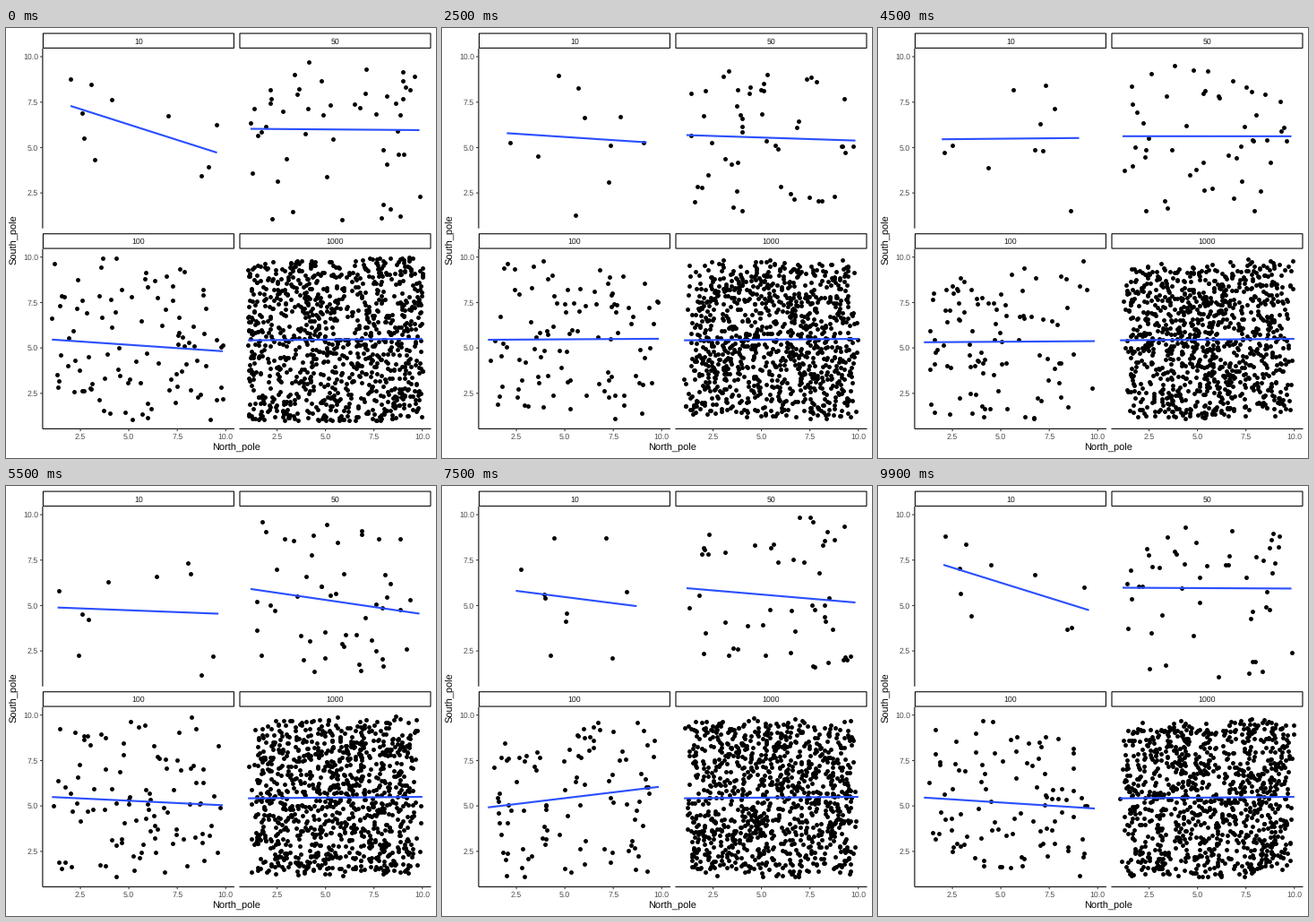
These frames come from a looping animation (480x480 px, 10000 ms). A matplotlib script:

```python
import numpy as np
import matplotlib.pyplot as plt
from matplotlib.animation import FuncAnimation
from matplotlib.patches import Rectangle

SIZE, DPI = 480, 80
PX = 72 / DPI                      # one pixel in points
LEFTS, TOPS = (40.9, 260.45), (22.9, 246.6)
PANEL_W, PANEL_H, STRIP_H = 214.05, 200.8, 17.4
LOW, HIGH = 1, 10                  # data range
VIEW_LOW, VIEW_HIGH = 0.55, 10.45  # data range with 5 % padding
STATES, STEPS = 10, 10
TICKS = (2.5, 5.0, 7.5, 10.0)
BLUE = "#2B50FF"

# Trend at each rest state: heights at both ends, in data units.
TRENDS = {
    10: [(7.29, 4.72), (4.96, 7.6), (5.8, 5.2), (5.67, 6.51), (5.5, 5.6),
         (4.84, 4.49), (5.6, 5.4), (5.76, 5.17), (6.52, 2.15), (6.55, 5.09)],
    50: [(6.03, 5.96), (4.07, 7.14), (5.7, 5.4), (5.48, 5.17), (5.6, 5.7),
         (5.95, 4.5), (5.4, 5.3), (5.98, 5.14), (5.63, 5.56), (5.3, 5.6)],
    100: [(5.46, 4.82), (6.2, 5.3), (5.5, 5.5), (4.73, 5.57), (5.3, 5.4),
          (5.49, 5.02), (5.5, 5.3), (4.84, 6.13), (6.02, 4.94), (5.46, 5.4)],
    1000: [(5.42, 5.5)] * STATES,
}
SPANS = {
    10: [(1.99, 9.55), (1.99, 9.5), (2.0, 9.3), (2.08, 8.11), (2.0, 9.0),
         (1.29, 9.64), (1.8, 9.4), (2.54, 8.65), (1.49, 9.5), (2.68, 9.55)],
    50: [(1.13, 9.85)] * STATES,
    100: [(1.03, 9.85)] * STATES,
    1000: [(1.0, 10.0)] * STATES,
}

plt.rcParams.update({"font.family": "Liberation Sans",
                     "text.hinting": "none"})
rng = np.random.default_rng(12)


def to_px(left, top, x, y):
    scale = VIEW_HIGH - VIEW_LOW
    return (left + (x - VIEW_LOW) / scale * PANEL_W,
            top + (VIEW_HIGH - y) / scale * PANEL_H)


def cloud(n, span, trend):
    """Uniform scatter whose least-squares fit is the given trend."""
    x = rng.uniform(0, 1, n)
    x = np.interp(x, (x.min(), x.max()), span)
    y = rng.uniform(LOW, HIGH, n)
    goal = np.interp(x, span, trend)
    for _ in range(8):
        y += goal - np.polyval(np.polyfit(x, y, 1), x)
        y = LOW + abs(y - LOW)         # fold strays back inside
        y = HIGH - abs(HIGH - y)
    return x, y


def tween(states, frame):
    k, step = divmod(frame, STEPS)
    hold = 3 if k == 0 else 4
    t = max(0, step - hold) / (STEPS - hold)
    t = (1 - np.cos(np.pi * t)) / 2
    return states[k] * (1 - t) + states[(k + 1) % STATES] * t


fig = plt.figure(figsize=(SIZE / DPI, SIZE / DPI), dpi=DPI, facecolor="white")
ax = fig.add_axes([0, 0, 1, 1])
ax.set_xlim(0, SIZE)
ax.set_ylim(SIZE, 0)
ax.axis("off")


def label(x, y, text, size=8.8, color="#4D4D4D", **kw):
    ax.text(x, y, text, fontsize=size * PX, color=color, **kw)


def rule(x, y, color="black"):
    ax.plot(x, y, color=color, lw=1.07 * PX, solid_capstyle="butt",
            snap=False)


def draw_frame(left, top, title):
    inset = 1.07 / 2
    ax.add_patch(Rectangle((left + inset, top - STRIP_H + inset),
                           PANEL_W - 2 * inset, STRIP_H - 2 * inset,
                           fc="white", ec="black", lw=1.07 * PX, snap=False))
    label(left + PANEL_W / 2, top - 5.2, title, color="#1A1A1A", ha="center")
    bottom = top + PANEL_H
    if left == LEFTS[0]:
        rule([left, left], [top, bottom])
        for v in TICKS:
            y = to_px(left, top, 0, v)[1]
            rule([left - 2.75, left], [y, y], "#333333")
            label(left - 4.9, y + 3.2, f"{v:.1f}", ha="right")
    if top == TOPS[1]:
        rule([left, left + PANEL_W], [bottom, bottom])
        for v in TICKS:
            x = to_px(left, top, v, 0)[0]
            rule([x, x], [bottom, bottom + 2.75], "#333333")
            label(x, bottom + 11.3, f"{v:.1f}", ha="center")


layers = []
for i, n in enumerate(TRENDS):
    left, top = LEFTS[i % 2], TOPS[i // 2]
    draw_frame(left, top, str(n))
    ends = list(zip(SPANS[n], TRENDS[n]))
    dots, = ax.plot([], [], "o", color="black", ms=4.9 * PX, mew=0, zorder=3)
    line, = ax.plot([], [], color=BLUE, lw=2.13 * PX, zorder=4,
                    solid_capstyle="butt")
    for artist, data in ((dots, [cloud(n, *e) for e in ends]),
                         (line, ends)):
        states = [np.array(to_px(left, top, *np.array(d))) for d in data]
        layers.append((artist, states))

label(257.5, 471.3, "North_pole", 11, "black", ha="center")
label(9.7, 236, "South_pole", 11, "black", ha="center", va="center",
      rotation=90)


def update(frame):
    for artist, states in layers:
        artist.set_data(*tween(states, frame))
    return [artist for artist, _ in layers]


anim = FuncAnimation(fig, update, frames=STATES * STEPS, interval=100,
                     repeat=True, repeat_delay=0)
plt.show()
```
